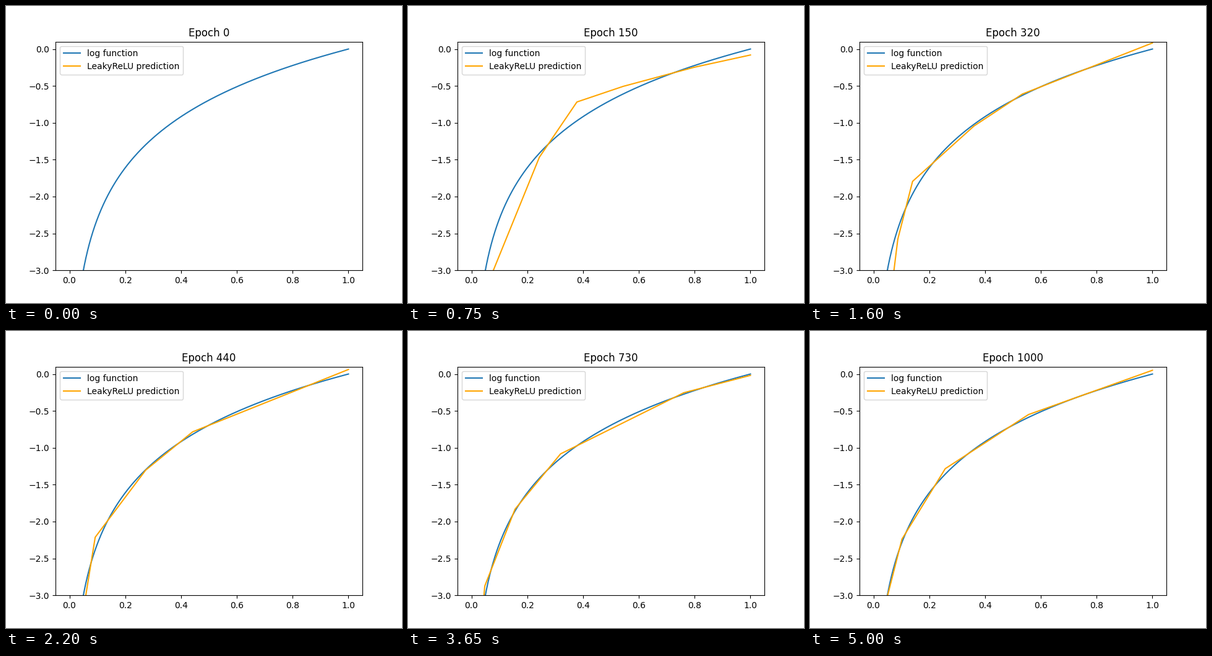
Write a matplotlib script that moves like this. It is 640x480 px and loops after 5.05 s.

```python
import numpy as np
import matplotlib.pyplot as plt
from matplotlib.animation import FuncAnimation

FRAMES, STEP = 101, 10
WARMUP = 150  # epochs until the bends start to drift left


def knots(u):
    """Bend positions and heights; u is the log of training time."""
    settle = np.exp(-6 * u)
    x = np.array([
        0.243 * np.exp(-1.35 * u),
        0.378 * np.exp(-1.31 * u),
        0.54 * np.exp(-0.31 * u - 0.3 * u**2),
        0.793 * np.exp(-0.48 * u - 0.06 * u**2),
        1.5 * np.exp(0.045 * u - 0.3 * u**2),
    ])
    lift = np.array([
        -0.055 - 0.11 * u,
        0.17 + 0.085 * settle,
        -0.07 + 0.06 * u + 0.176 * settle,
        -0.02 + 0.05 * u,
        0.018 + 0.33 * (u - 1.65)**2 - 0.99 * settle,
    ])
    return x, np.log(x) + lift


def fit(epoch, x):
    """Piecewise linear fit with straight ends beyond the outer bends."""
    u = np.log(max(epoch, WARMUP) / WARMUP)
    kx, ky = knots(u)
    left = (9.3 + 28 * u) * np.minimum(x - kx[0], 0)
    right = 0.75 / kx[-1] * np.maximum(x - kx[-1], 0)
    return np.interp(x, kx, ky) + left + right


def predict(epoch, x):
    # A flat line sinks to the mean of log, then bends into shape.
    level = -1 + 1.22 * np.exp(-epoch / 20)
    p = min(epoch / WARMUP, 1)
    shape = p * p * (3 - 2 * p)
    return level + shape * (fit(epoch, x) - level)


fig, ax = plt.subplots(figsize=(6.4, 4.8), dpi=100)
xs = np.linspace(0.0001, 1, 1000)
ax.plot(xs, np.log(xs), label="log function")
curve, = ax.plot([], [], color="orange", label="LeakyReLU prediction")
ax.set_xlim(-0.05, 1.05)
ax.set_ylim(-3, 0.1)
ax.legend(loc="upper left")
title = ax.set_title("Epoch 0")


def update(i):
    epoch = i * STEP
    curve.set_data(xs, predict(epoch, xs))
    title.set_text(f"Epoch {epoch}")
    return curve, title


anim = FuncAnimation(fig, update, frames=FRAMES, interval=50,
                     init_func=lambda: update(0), repeat=True, repeat_delay=0)
plt.show()
```
